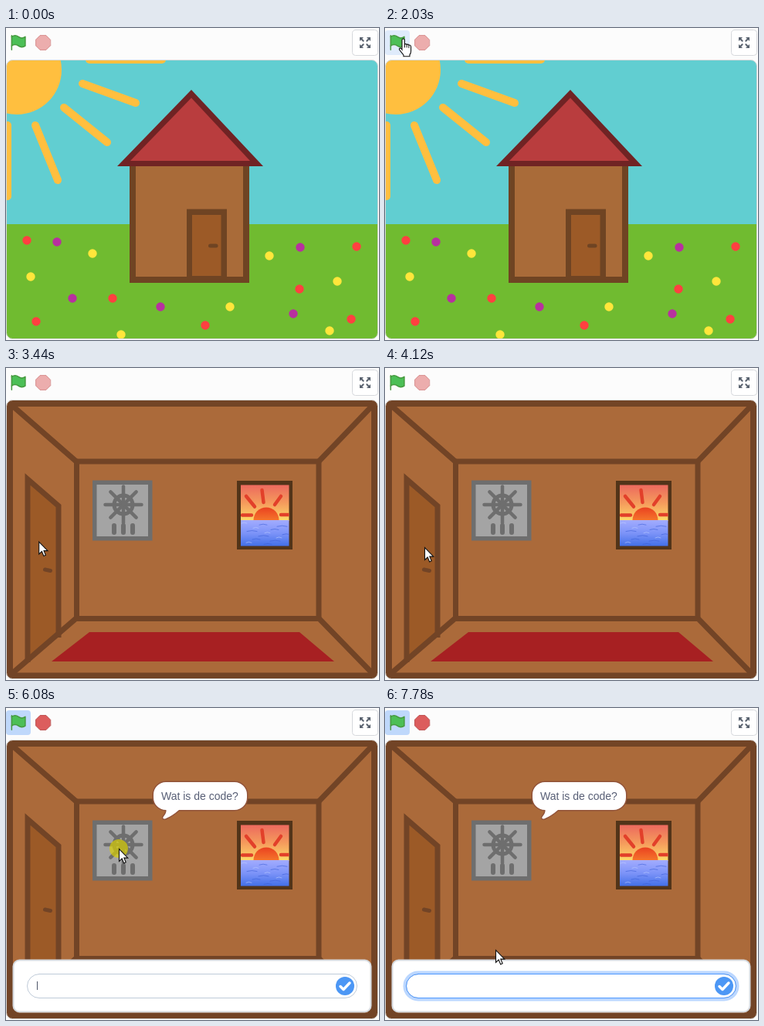
Animation, 483 px wide and 404 px high, one loop 8000 ms. Source, as an HTML page with a canvas:

```html
<!DOCTYPE html>
<html lang="nl">
<head>
<meta charset="utf-8">
<title>Wat is de code?</title>
<style>
html, body { margin: 0; width: 100%; height: 100%; overflow: hidden; background: #fcfcfc; }
canvas { display: block; }
</style>
</head>
<body>
<canvas id="stage" width="483" height="404"></canvas>
<script>
const ctx = document.getElementById('stage').getContext('2d');
const LOOP = 8000;
const WOOD = '#724426', WALL = '#ab6a3a', DOOR = '#9c5a27';

// Pointer trips: start, end, number of steps, then way points [time, x, y]
const trips = [
  [1080, 1760, 11, [[1080, 46, 88], [1290, 39, 62], [1490, 29, 32], [1690, 23, 16], [1760, 23, 14]]],
  [3100, 3790, 11, [[3100, 26, 38], [3240, 33, 110], [3440, 42, 224], [3590, 48, 239], [3790, 51, 232]]],
  [4710, 5480, 12, [[4710, 53, 234], [4850, 62, 239], [5060, 88, 222], [5270, 118, 197], [5480, 143, 183]]],
  [5540, 5610, 2, [[5540, 144, 183], [5610, 146, 182]]],
  [7300, 7780, 7, [[7300, 147, 190], [7460, 148, 232], [7620, 145, 290], [7780, 143, 313]]]
];
const clicks = [[1960, 2030], [4050, 4120], [6010, 6140]];

function along(points, t) {
  let i = 0;
  while (i < points.length - 2 && t > points[i + 1][0]) i++;
  const [t0, x0, y0] = points[i], [t1, x1, y1] = points[i + 1];
  const k = Math.max(0, Math.min(1, (t - t0) / (t1 - t0)));
  return { x: x0 + (x1 - x0) * k, y: y0 + (y1 - y0) * k };
}

function pointerAt(t) {
  const trip = trips.filter(p => p[0] <= t).pop();
  if (!trip) return null;
  const [start, end, steps, points] = trip;
  const dt = (end - start) / (steps - 1);
  const n = Math.min(steps - 1, Math.floor((t - start) / dt + 0.1));
  return along(points, start + n * dt);
}

function rect(x, y, w, h, color) {
  ctx.fillStyle = color;
  ctx.fillRect(x, y, w, h);
}

function round(x, y, w, h, r, fill, stroke, width = 1) {
  ctx.beginPath();
  ctx.roundRect(x, y, w, h, r);
  if (fill) { ctx.fillStyle = fill; ctx.fill(); }
  if (stroke) { ctx.strokeStyle = stroke; ctx.lineWidth = width; ctx.stroke(); }
}

function disc(x, y, r, color) {
  ctx.beginPath();
  ctx.arc(x, y, r, 0, 7);
  ctx.fillStyle = color;
  ctx.fill();
}

function poly(color, ...p) {
  ctx.beginPath();
  for (let i = 0; i < p.length; i += 2) ctx.lineTo(p[i], p[i + 1]);
  ctx.closePath();
  ctx.fillStyle = color;
  ctx.fill();
}

function line(x0, y0, x1, y1, width, color, cap = 'round') {
  ctx.beginPath();
  ctx.moveTo(x0, y0);
  ctx.lineTo(x1, y1);
  ctx.lineCap = cap;
  ctx.lineWidth = width;
  ctx.strokeStyle = color;
  ctx.stroke();
}

function fade(y0, y1, ...colors) {
  const g = ctx.createLinearGradient(0, y0, 0, y1);
  colors.forEach((c, i) => g.addColorStop(i / (colors.length - 1), c));
  return g;
}

function dots(color, ...p) {
  for (let i = 0; i < p.length; i += 2) disc(p[i], p[i + 1], 5.7, color);
}

function drawGarden() {
  const sun = '#ffbf3f';
  rect(0, 41, 483, 213, '#61ced1');
  rect(0, 254, 483, 150, '#70bb30');
  disc(14, 54, 58, sun);
  line(108, 41, 202, 41, 10, sun);
  line(99, 72, 168, 97, 10, sun);
  line(75, 103, 131, 148, 10, sun);
  line(38, 126, 67, 197, 10, sun);
  line(2, 126, 2, 218, 10, sun);

  rect(160, 174, 155, 156, '#6f4423');
  rect(168, 174, 139, 148, '#a96b39');
  poly('#702324', 144, 179, 240, 80, 333, 179);
  poly('#b93d3e', 161, 172, 240, 90.5, 316, 172);
  rect(234, 234.5, 52, 91, '#6f4423');
  rect(241, 242, 37.5, 79, DOOR);
  line(264.5, 282, 272, 282, 5, '#6f4423');

  dots('#ff4040', 27, 275, 138, 350, 39, 380, 258, 385, 380, 338, 454, 283, 447, 377);
  dots('#b8309f', 66, 277, 86, 350, 200, 361, 381, 284, 372, 370);
  dots('#ffe63b', 112, 292, 32, 322, 149, 397, 290, 361, 341, 295, 429, 328, 419, 392);
}

function drawSafe() {
  const dark = '#6e6e6e';
  rect(112, 145.5, 77.5, 78, dark);
  rect(117.5, 151, 66.5, 67, '#a4a4a4');
  ctx.beginPath();
  ctx.arc(152, 177, 12, 0, 7);
  ctx.lineWidth = 5;
  ctx.strokeStyle = dark;
  ctx.stroke();
  for (let i = 0; i < 4; i++) {
    const x = Math.cos(i * Math.PI / 4) * 23.5, y = Math.sin(i * Math.PI / 4) * 23.5;
    line(152 - x, 177 - y, 152 + x, 177 + y, 4.5, dark);
  }
  for (const x of [140, 152, 164]) line(x, 204, x, 213, 6, dark);
}

function drawPainting() {
  rect(299, 146, 72, 89, '#523419');
  ctx.save();
  ctx.beginPath();
  ctx.rect(304, 151.5, 62.5, 79);
  ctx.clip();
  rect(304, 151, 63, 47, fade(151, 198, '#ec685e', '#f59a5c', '#fddb68'));
  ctx.beginPath();
  ctx.arc(337, 197, 16.5, Math.PI, 0);
  ctx.fillStyle = fade(180, 198, '#ea4020', '#f5782c');
  ctx.fill();
  const red = '#e2402a';
  line(306, 190.5, 318, 190.5, 4.5, red);
  line(311, 166, 322, 179.5, 4.5, red);
  line(331.5, 158, 333.5, 174, 4.5, red);
  line(356, 166, 348, 177, 4.5, red);
  line(356, 190, 368, 190, 4.5, red);
  rect(304, 197, 63, 34, fade(197, 231, '#a3acff', '#7c93f8', '#416fe8'));
  for (let i = 0; i < 14; i++) {
    const x = 305 + (i * 23) % 54, y = 201 + i * 2.1, w = 7 + i % 3 * 3;
    ctx.beginPath();
    ctx.moveTo(x, y);
    ctx.quadraticCurveTo(x + w / 2, y - 2, x + w, y);
    ctx.lineWidth = 1;
    ctx.strokeStyle = i % 3 ? 'rgba(60,95,215,.6)' : 'rgba(190,205,255,.6)';
    ctx.stroke();
  }
  ctx.restore();
}

function drawRoom() {
  rect(0, 41, 483, 363, WALL);
  poly('#a72022', 108, 342, 380, 342, 425, 380, 59, 380);
  poly(DOOR, 28, 143, 68, 178, 68, 346, 28, 379);
  ctx.beginPath();
  ctx.moveTo(28, 381);
  ctx.lineTo(28, 144);
  ctx.lineTo(68, 178.5);
  ctx.lineTo(68, 349);
  ctx.lineWidth = 7;
  ctx.lineCap = 'butt';
  ctx.strokeStyle = WOOD;
  ctx.stroke();
  line(50.5, 261, 57.5, 262.5, 5, WOOD);
  line(5, 46, 91, 121, 7, WOOD);
  line(477, 46, 405, 121, 7, WOOD);
  line(5, 398, 91, 324, 7, WOOD);
  line(477, 398, 405, 324, 7, WOOD);
  ctx.lineWidth = 7;
  ctx.strokeRect(91.5, 121, 313.5, 203.5);
  ctx.lineWidth = 8;
  round(5, 46, 472, 352.5, 4, null, WOOD, 8);
  drawSafe();
  drawPainting();
}

function drawBubble() {
  ctx.beginPath();
  ctx.moveTo(206, 96);
  ctx.lineTo(297, 96);
  ctx.arc(296, 112, 16, -Math.PI / 2, 0);
  ctx.lineTo(312, 116);
  ctx.arc(296, 116, 16, 0, Math.PI / 2);
  ctx.lineTo(224, 132);
  ctx.quadraticCurveTo(215, 140, 206, 143.5);
  ctx.quadraticCurveTo(202, 144, 204, 140.5);
  ctx.quadraticCurveTo(208, 136, 207.5, 132);
  ctx.arc(207, 116, 16, Math.PI / 2, Math.PI);
  ctx.lineTo(191, 112);
  ctx.arc(207, 112, 16, Math.PI, -Math.PI / 2);
  ctx.closePath();
  ctx.lineWidth = 3;
  ctx.strokeStyle = '#92543a';
  ctx.stroke();
  ctx.fillStyle = '#fff';
  ctx.fill();
  ctx.font = '14px "Liberation Sans", Arial, sans-serif';
  ctx.fillStyle = '#575e75';
  ctx.fillText('Wat is de code?', 201, 119);
}

function drawQuestion(t) {
  const focus = Math.max(0, Math.min(1, (t - 6080) / 260));
  const caret = t < 6620 || (t >= 7080 && t < 7600);
  round(9.5, 326.5, 463, 67, 8, '#fff', '#d5d9de', 2);
  if (focus) round(25.5, 342.5, 431, 35, 17.5, null, `rgba(76,151,255,${0.38 * focus})`, 4);
  round(27.5, 344.5, 427, 31, 15.5, '#fff', '#bfcbd9');
  if (focus) round(27.5, 344.5, 427, 31, 15.5, null, `rgba(76,151,255,${focus})`);
  if (caret) rect(40, 354, 1, 11, '#4d5367');
  disc(439, 360, 12, '#4c97f5');
  ctx.beginPath();
  ctx.moveTo(433, 360.5);
  ctx.lineTo(437, 364.5);
  ctx.lineTo(445, 356);
  ctx.lineWidth = 3.4;
  ctx.lineCap = ctx.lineJoin = 'round';
  ctx.strokeStyle = '#fff';
  ctx.stroke();
  ctx.lineJoin = 'miter';
}

const cloth = new Path2D('M.75,2A6.44,6.44,0,0,1,8.44,2A6.44,6.44,0,0,0,16.13,2V12.4A6.44,6.44,0,0,1,8.44,12.4A6.44,6.44,0,0,0,.75,12.4');
const pole = new Path2D('M.75,16.75V.75');
const arrow = new Path2D('M.5,.5V16.5L4.2,13L6.7,18.9L9.2,17.8L6.8,12.1H11.8Z');
const hand = new Path2D('M22 15.2Q23.7 12.6 25.4 15.2V21Q27 20 28.1 21.4Q29.8 20.7 30.8 22.1Q33.2 21.8 33.6 24V30Q33.6 33 32 34.5V36.7H24V35L19 28.6Q17.7 26.5 19.6 25.9Q20.8 26 22 28Z');

function drawBar(hover, running) {
  if (running || hover) round(0, 3, 32, 32, 4, running ? '#bfd8fb' : '#dfebfb');
  ctx.save();
  ctx.translate(6.5, 9);
  ctx.scale(1.143, 1.143);
  ctx.fillStyle = '#4cbf56';
  ctx.strokeStyle = '#45993d';
  ctx.lineWidth = 1.3;
  ctx.lineCap = ctx.lineJoin = 'round';
  ctx.fill(cloth);
  ctx.stroke(cloth);
  ctx.stroke(pole);
  ctx.restore();

  ctx.save();
  ctx.globalAlpha = running ? 1 : 0.5;
  ctx.beginPath();
  for (let i = 0; i < 8; i++) {
    const a = (i + 0.5) * Math.PI / 4;
    ctx.lineTo(48 + Math.cos(a) * 10.2, 19 + Math.sin(a) * 10.2);
  }
  ctx.closePath();
  ctx.fillStyle = '#dc5d5d';
  ctx.fill();
  ctx.strokeStyle = '#bd5252';
  ctx.lineWidth = 1;
  ctx.stroke();
  ctx.restore();

  round(448.5, 2.5, 33, 33, 4, '#fff', '#d6d8dc');
  for (const sx of [-1, 1]) for (const sy of [-1, 1]) {
    const p = (x, y) => [465 + sx * x, 19 + sy * y];
    poly('#59626f', ...p(7, 7), ...p(2, 7), ...p(7, 2));
    line(...p(5, 5), ...p(2.3, 2.3), 2, '#59626f');
  }
}

function drawPointer(pos, hover, clicked) {
  if (clicked) disc(pos.x, pos.y, 12, 'rgba(218,208,0,.68)');
  ctx.save();
  if (hover) ctx.translate(pos.x - 23, pos.y - 14);
  else ctx.translate(pos.x, pos.y);
  const shape = hover ? hand : arrow;
  ctx.fillStyle = '#fff';
  ctx.strokeStyle = '#111';
  ctx.lineWidth = 1.1;
  ctx.fill(shape);
  ctx.stroke(shape);
  if (hover) {
    line(25.5, 21, 25.5, 25, 1, '#111');
    line(28.2, 21.5, 28.2, 25, 1, '#111');
    line(30.9, 22.3, 30.9, 25.5, 1, '#111');
  }
  ctx.restore();
}

function draw(t) {
  const pos = pointerAt(t);
  const hover = pos && pos.x < 32 && pos.y < 35;
  const clicked = clicks.some(([a, b]) => t >= a && t < b);
  const running = (t >= 4050 && t < 4120) || t >= 6010;

  rect(0, 0, 483, 404, '#fcfcfc');
  drawBar(hover, running);
  ctx.save();
  ctx.beginPath();
  ctx.roundRect(0.5, 41.5, 481, 361, 8);
  ctx.clip();
  if (t < 2090) drawGarden();
  else drawRoom();
  ctx.restore();
  round(0.5, 41.5, 481, 361, 8, null, '#d6d8d8');
  if (t >= 6080) {
    drawBubble();
    drawQuestion(t);
  }
  if (pos) drawPointer(pos, hover, clicked);
}

const begin = performance.now();
function tick() {
  draw((performance.now() - begin) % LOOP);
  requestAnimationFrame(tick);
}
tick();
</script>
</body>
</html>
```
